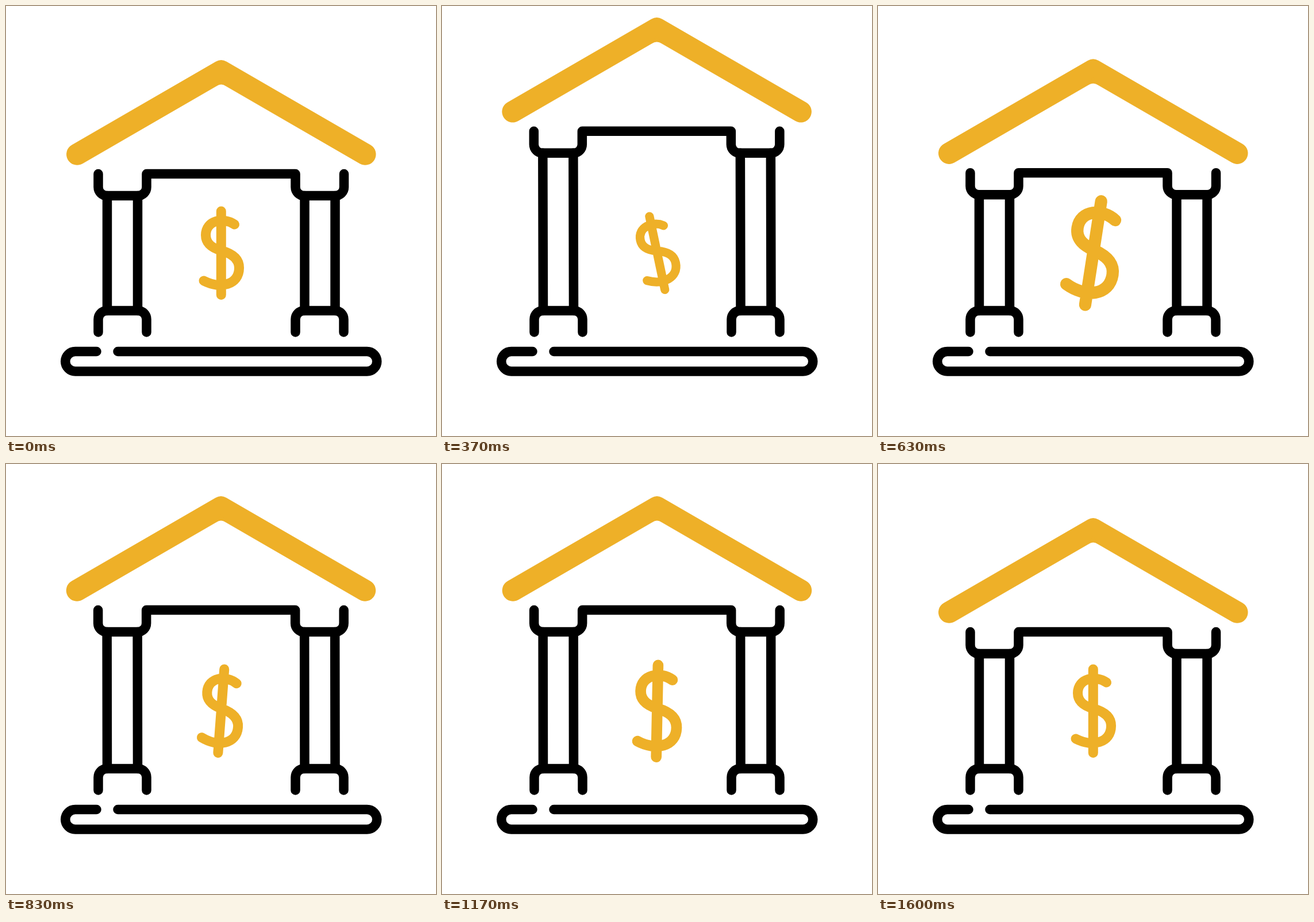
Recreate the animation shown at these times as an HTML page with a canvas. Size 748x748 px, loop 2 s.

```html
<!DOCTYPE html>
<html lang="en">
<head>
<meta charset="utf-8">
<title>Bouncing bank</title>
<style>
  html, body { margin: 0; width: 100%; height: 100%; overflow: hidden; background: #fff; }
  canvas { display: block; width: 748px; height: 748px; }
</style>
</head>
<body>
<canvas id="stage" width="748" height="748"></canvas>
<script>
const ctx = document.getElementById('stage').getContext('2d');
const GOLD = '#eeb028', BLACK = '#000';
const LOOP = 2000, FPS = 30, LAST_STEP = 48, BOUNCE_STEPS = 20;

// [step, value] turning points, joined by a cosine ease
const COIN_SCALE = [[0, 1], [7, .885], [10, .885], [19.5, 1.255], [27.5, .93], [35.5, 1.1], [48, 1]];
const COIN_ANGLE = [[0, 0], [3, 0], [11.5, -12], [19.5, 9], [30, .2], [36, 1.2], [48, 0]];

const PLINTH = new Path2D(
  'M157.5 601H120.5A17.25 17.25 0 0 0 120.5 635.5H628A17.25 17.25 0 0 0 628 601H194.5');
const FEET = new Path2D([160.5, 503.5].map(x =>
  `M${x} 567.5V545a15 15 0 0 1 15 -15h54a15 15 0 0 1 15 15V567.5`).join(''));
const CAPITALS = new Path2D(
  'M160.5 292v23a15 15 0 0 0 15 15h54a15 15 0 0 0 15 -15v-23' +
  'H503.5v23a15 15 0 0 0 15 15h54.5a15 15 0 0 0 15 -15v-23');
const ROOF = new Path2D('M123.8 258L374.3 113L624.8 258');
const ROOF_FILLET = new Path2D('M365.3 139.2Q374.3 134 383.3 139.2L374.3 125Z');
const DOLLAR = new Path2D(
  'M374.3 357V502.5M397.5 380C378 366.5 347.5 373 347.5 398.5' +
  'C347.5 415 361 421.5 374.5 425.5C391 430 405.5 438 405.5 455.5C405.5 485 373 493 344 478');
const COLUMN_XS = [176, 229, 519.5, 572.5];

function tween(keys, step) {
  const next = Math.max(1, keys.findIndex(([at]) => at >= step));
  const [t0, v0] = keys[next - 1], [t1, v1] = keys[next];
  const eased = (1 - Math.cos(Math.PI * (step - t0) / (t1 - t0))) / 2;
  return v0 + (v1 - v0) * eased;
}

function stroke(path, color, width) {
  ctx.strokeStyle = color;
  ctx.lineWidth = width;
  ctx.stroke(path);
}

function drawBuilding(lift) {
  const drift = -lift * .009;
  const columns = new Path2D();
  for (const x of COLUMN_XS) {
    columns.moveTo(x, 530);
    columns.lineTo(x + drift, 330 - lift);
  }
  stroke(PLINTH, BLACK, 16.5);
  stroke(FEET, BLACK, 16.5);
  stroke(columns, BLACK, 16.5);

  ctx.save();
  ctx.translate(drift, -lift);
  stroke(CAPITALS, BLACK, 16.5);
  stroke(ROOF, GOLD, 37.5);
  ctx.fillStyle = GOLD;
  ctx.fill(ROOF_FILLET);
  ctx.restore();
}

function drawDollar(scale, degrees) {
  ctx.save();
  ctx.translate(374.3, 429.7);
  ctx.rotate(degrees * Math.PI / 180);
  ctx.scale(scale, scale);
  ctx.translate(-374.3, -429.7);
  stroke(DOLLAR, GOLD, 17);
  ctx.restore();
}

function draw(time) {
  const step = Math.min(LAST_STEP, Math.floor((time % LOOP + 3.4) * FPS / 1000));
  const bounceStep = Math.min(step, 2 * BOUNCE_STEPS);
  const lift = 38 * (1 - Math.cos(2 * Math.PI * bounceStep / BOUNCE_STEPS));

  ctx.fillStyle = '#fff';
  ctx.fillRect(0, 0, 748, 748);
  ctx.lineCap = ctx.lineJoin = 'round';
  drawBuilding(lift);
  drawDollar(tween(COIN_SCALE, step), tween(COIN_ANGLE, step));
}

const start = performance.now();
function tick() {
  draw(performance.now() - start);
  requestAnimationFrame(tick);
}
tick();
</script>
</body>
</html>
```
